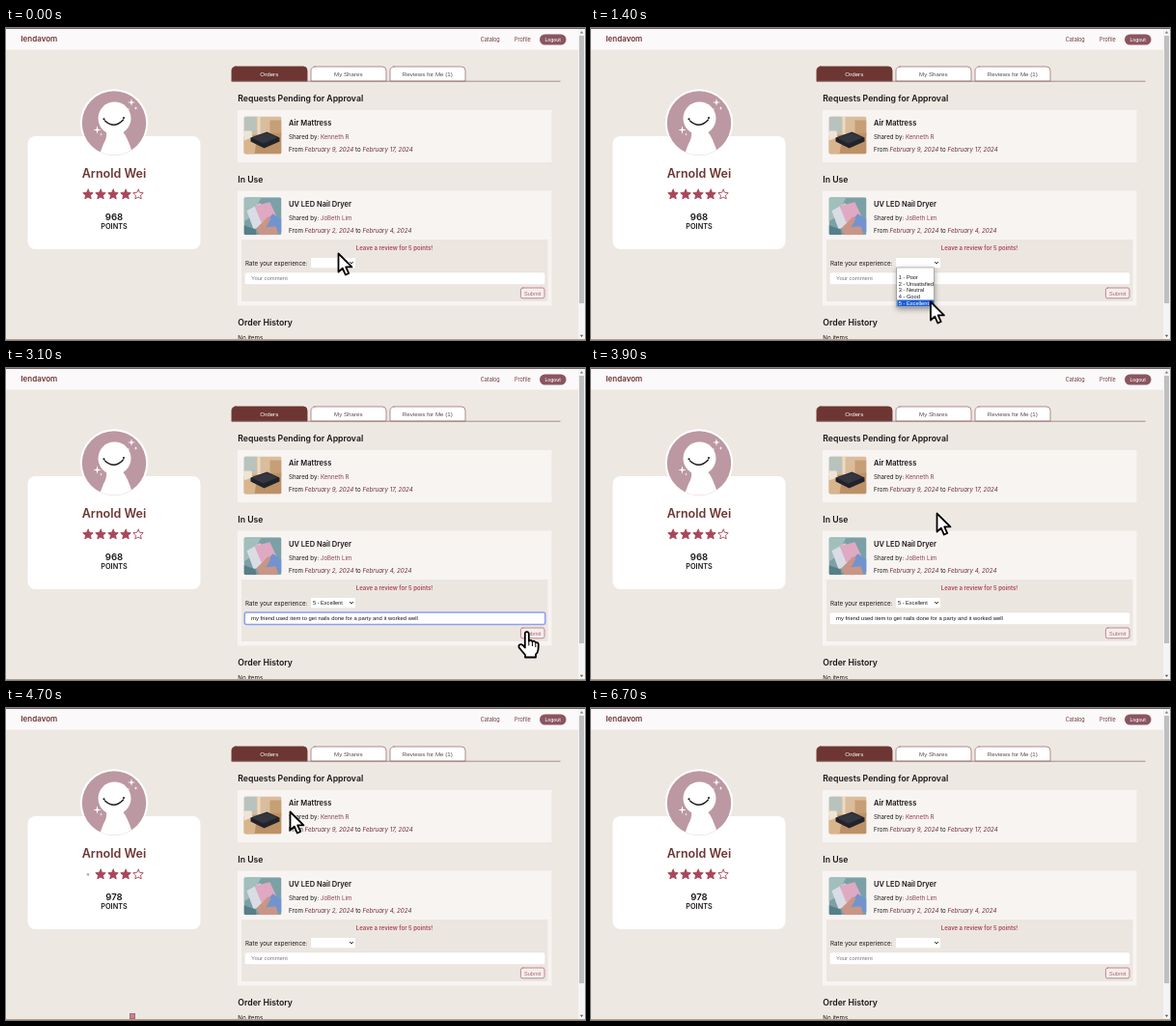
An HTML page with a canvas for the animation above (6900 ms loop, 600 px wide and 323 px high).

```html
<!DOCTYPE html>
<html lang="en">
<head>
<meta charset="utf-8">
<title>Profile page</title>
<style>
html, body { margin: 0; width: 100%; height: 100%; overflow: hidden; background: #ede8e2; }
canvas { display: block; width: 600px; height: 323px; }
</style>
</head>
<body>
<canvas id="stage"></canvas>
<script>
const W = 600, H = 323, LOOP = 6900, STEP = 100;
const RELOAD = 4200, LOADED = 4500, BURST = 4700, CURSOR_END = 6200;
const cv = document.getElementById('stage');
const g = cv.getContext('2d');
const dpr = window.devicePixelRatio || 1;
cv.width = W * dpr;
cv.height = H * dpr;

const SANS = 'Inter, sans-serif';
const ARIAL = '"Liberation Sans", Arial, sans-serif';
const BROWN = '#6d3632', PLUM = '#8b5560', ROSE = '#a9475a', INK = '#1c1718';
const COMMENT = 'my friend used item to get nails done for a party and it worked well';
const OPTIONS = ['1 - Poor', '2 - Unsatisfied', '3 - Neutral', '4 - Good', '5 - Excellent'];

function text(s, x, y, size, color, weight = '400', family = SANS, align = 'left') {
  g.font = `${weight} ${size}px ${family}`;
  g.fillStyle = color;
  g.textAlign = align;
  g.fillText(s, x, y);
  return x + g.measureText(s).width;
}

function box(x, y, w, h, r, fill, stroke, lw = 1) {
  g.beginPath();
  g.roundRect(x, y, w, h, r);
  if (fill) { g.fillStyle = fill; g.fill(); }
  if (stroke) { g.strokeStyle = stroke; g.lineWidth = lw; g.stroke(); }
}

function poly(pts, fill) {
  g.beginPath();
  pts.forEach(([x, y]) => g.lineTo(x, y));
  g.closePath();
  if (fill) { g.fillStyle = fill; g.fill(); }
}

function disc(x, y, r, fill) {
  g.beginPath();
  g.arc(x, y, r, 0, 7);
  g.fillStyle = fill;
  g.fill();
}

function clipped(x, y, w, h, r, draw) {
  g.save();
  g.beginPath();
  g.roundRect(x, y, w, h, r);
  g.clip();
  g.translate(x, y);
  draw();
  g.restore();
}

function seeded(seed) {
  return () => (seed = (seed * 16807) % 2147483647) / 2147483647;
}

function header(loaded) {
  box(0, 0, W, 22.5, 0, '#fcf9fb');
  box(0, 0, W, 1, 0, '#66605f');
  text('lendavom', 15.5, 14.4, 8, BROWN, '600');
  if (!loaded) {
    text('Catalog', 557, 14, 5.5, BROWN);
    return;
  }
  text('Catalog', 491.7, 14, 5.5, BROWN);
  text('Profile', 527, 14, 5.5, BROWN);
  box(553, 6.5, 27.5, 11, 5.5, PLUM);
  text('Logout', 566.7, 13.8, 4.9, '#fff', '500', SANS, 'center');
  box(593, 1, 7, 321, 0, '#f5f4f4');
  box(594, 8, 5, 277, 0, '#c0bfbf');
  poly([[594.8, 5.4], [598.2, 5.4], [596.5, 3.2]], '#777');
  poly([[594.8, 317.8], [598.2, 317.8], [596.5, 320]], '#555');
}

function sparkle(x, y, r) {
  const k = r * 0.2;
  poly([[x, y - r], [x + k, y - k], [x + r, y], [x + k, y + k],
    [x, y + r], [x - k, y + k], [x - r, y], [x - k, y - k]], '#fff');
}

function avatar() {
  disc(112, 98.5, 35.2, '#fff');
  g.save();
  g.beginPath();
  g.arc(112, 98.5, 33.2, 0, 7);
  g.clip();
  box(76, 60, 72, 72, 0, '#bb98a2');
  disc(112.5, 93.5, 17, '#fff');
  g.beginPath();
  g.moveTo(104, 106);
  g.quadraticCurveTo(105, 114, 101, 120);
  g.lineTo(96, 133);
  g.lineTo(132, 133);
  g.quadraticCurveTo(127, 114, 120, 106);
  g.fillStyle = '#fff';
  g.fill();
  g.restore();
  g.strokeStyle = INK;
  g.lineWidth = 1.3;
  g.lineCap = 'round';
  g.beginPath();
  g.moveTo(102.5, 96);
  g.quadraticCurveTo(112, 105, 121.5, 95);
  g.stroke();
  disc(101.5, 94.3, 1.1, INK);
  disc(122, 93, 1.1, INK);
  sparkle(94.5, 105.5, 4.3);
  sparkle(98.5, 110, 1.8);
  sparkle(130, 77, 4);
  sparkle(134.5, 83, 2);
  sparkle(127, 84, 1.5);
}

function star(x, y, r, turn, filled) {
  const pts = [];
  for (let i = 0; i < 10; i++) {
    const a = turn + i * Math.PI / 5 - Math.PI / 2, d = i % 2 ? r * 0.48 : r;
    pts.push([x + d * Math.cos(a), y + d * Math.sin(a)]);
  }
  poly(pts, filled ? ROSE : '#fff');
  g.strokeStyle = ROSE;
  g.lineWidth = 0.9;
  g.lineJoin = 'round';
  g.stroke();
}

function profile(t) {
  box(22.5, 112, 179, 117, 8, '#fff');
  avatar();
  text('Arnold Wei', 112, 154.8, 12.5, BROWN, '600', SANS, 'center');
  for (let i = 0; i < 5; i++) {
    const p = (t - BURST - i * 250) / 500;
    let size = 1, turn = 0;
    if (p >= 0 && p < 1) {
      const e = 1 - (1 - p) ** 3;
      size = 0.25 + 0.75 * e;
      turn = (1 - e) * -2;
      g.globalAlpha = 0.35 + 0.65 * e;
    }
    star(85 + 13 * i, 172.4, 5.5 * size, turn, i < 4);
    g.globalAlpha = 1;
  }
  text(t < RELOAD ? '968' : '978', 112, 199, 9.6, INK, '600', SANS, 'center');
  text('POINTS', 112, 208.4, 7.3, INK, '600', SANS, 'center');
}

function tab(x, label, active) {
  const r = [4, 4, 0, 0];
  box(x + 0.5, 40, 78, 15, r, active ? BROWN : '#fff', active ? BROWN : '#a98083', 0.9);
  text(label, x + 39.3, 49.8, 6.2, active ? '#fff' : '#5b4a4b', '400', ARIAL, 'center');
}

function mattressPhoto() {
  box(0, 0, 39, 39, 0, '#d9bd9c');
  box(0, 0, 13, 17, 0, '#b9c3bd');
  box(14, 0, 3, 19, 0, '#eadbc4');
  box(27, 4, 12, 16, 0, '#c79f77');
  poly([[0, 20], [39, 17], [39, 39], [0, 39]], '#bd9166');
  poly([[0, 25], [14, 20], [11, 39], [0, 39]], '#d8b58d');
  poly([[0, 15], [8, 15], [9, 22], [0, 25]], '#eee4d6');
  poly([[7, 22], [24, 16], [37, 22], [37, 26], [21, 33], [7, 26]], '#22232a');
  poly([[8, 22], [24, 17], [35, 22], [20, 28]], '#343640');
}

function dryerPhoto() {
  box(0, 0, 39, 39, 0, '#7ba0a6');
  poly([[0, 0], [18, 0], [8, 20], [0, 25]], '#a2bfbb');
  poly([[3, 14], [17, 6], [25, 28], [10, 33]], '#d9dce4');
  poly([[11, 9], [27, 5], [34, 20], [18, 26]], '#dfa9c2');
  poly([[20, 28], [30, 17], [39, 23], [39, 36], [28, 37]], '#7194cf');
  poly([[13, 32], [25, 20], [28, 22], [23, 31], [33, 30], [36, 39], [16, 39]], '#c99587');
  poly([[0, 29], [12, 33], [13, 39], [0, 39]], '#577f88');
}

function item(y, title, owner, from, to, photo) {
  clipped(246.5, y, 39, 39, 2, photo);
  text(title, 293, y + 9.6, 7.5, INK, '600');
  let x = text('Shared by: ', 293, y + 23.6, 6.15, INK);
  text(owner, x, y + 23.6, 6.15, '#8b3f55');
  const it = 'italic 400';
  x = text('From ', 293, y + 36.2, 6.2, INK);
  x = text(from, x, y + 36.2, 6.2, '#6f2f3b', it);
  x = text(' to ', x, y + 36.2, 6.2, INK);
  text(to, x, y + 36.2, 6.2, '#6f2f3b', it);
}

function review(t) {
  const active = t < RELOAD;
  const typed = active ? Math.round(COMMENT.length * Math.min(1, Math.max(0, (t - 2200) / 600))) : 0;
  const focus = t >= 2100 && t < 3300;

  box(244, 219, 317.5, 64, 0, '#ece6e0');
  text('Leave a review for 5 points!', 402.5, 230.2, 6, ROSE, '600', SANS, 'center');
  text('Rate your experience:', 248, 246, 6.25, INK);
  box(316, 238, 46, 10.3, 1, '#fff');
  if (active && t >= 1600) text(OPTIONS[4], 318, 245.2, 5.6, INK, '400', ARIAL);
  g.strokeStyle = INK;
  g.lineWidth = 0.9;
  g.beginPath();
  g.moveTo(356.4, 242.3);
  g.lineTo(358, 244);
  g.lineTo(359.6, 242.3);
  g.stroke();

  box(247.3, 253, 311.4, 12.5, 2, '#fff', focus ? '#8c9ff0' : '#e6dfdb', focus ? 1.5 : 0.5);
  const end = typed ? text(COMMENT.slice(0, typed), 254, 261.3, 5.9, INK, '400', ARIAL)
    : (text('Your comment', 254, 261.3, 5.9, '#7d7778', '400', ARIAL), 253.6);
  if (focus && t < 2900) box(end, 256, 0.7, 7, 0, INK);

  box(533.4, 269, 24.6, 10.8, 2, '#f4eeeb', '#bd7c88', 0.9);
  text('Submit', 545.7, 276.5, 5.6, '#b0697a', '400', ARIAL, 'center');
}

function dropdown(t) {
  if (t < 300 || t >= 1600) return;
  const row = [600, 700, 1000, 1200, 1300].filter(s => t >= s).length;
  g.save();
  g.shadowColor = 'rgba(0,0,0,.4)';
  g.shadowBlur = 6 * dpr;
  g.shadowOffsetY = 2 * dpr;
  box(317, 248, 38.5, 40.8, 0, '#fff');
  g.restore();
  box(317, 248, 38.5, 40.8, 0, null, '#8e8a8a', 0.6);
  box(317.3, 247.7 + 6.75 * row, 38, 6.7, 0, '#1d5fd3');
  OPTIONS.forEach((s, i) =>
    text(s, 318.7, 259.8 + 6.75 * i, 5.7, row === i + 1 ? '#fff' : INK, '400', ARIAL));
}

function orders(t) {
  tab(233.5, 'Orders', true);
  tab(315.5, 'My Shares');
  tab(397.5, 'Reviews for Me (1)');
  box(233.5, 54.7, 341, 0.9, 0, '#8d6a68');
  text('Requests Pending for Approval', 240.3, 76.3, 8.7, INK, '600');
  box(240, 85, 325.5, 54, 0, '#f7f4f2');
  item(91.5, 'Air Mattress', 'Kenneth R', 'February 9, 2024', 'February 17, 2024', mattressPhoto);
  text('In Use', 240.3, 160.2, 8.7, INK, '600');
  box(240, 168.5, 325.5, 119, 0, '#f7f4f2');
  item(175.3, 'UV LED Nail Dryer', 'JoBeth Lim', 'February 2, 2024', 'February 4, 2024', dryerPhoto);
  review(t);
  text('Order History', 240.3, 308.2, 8.7, INK, '600');
  text('No items.', 240.3, 323.2, 6.2, INK);
  dropdown(t);
}

// Launch speed decays exponentially while a constant drift pulls down.
function confetti(t) {
  const s = (t - BURST) / 1000;
  if (s < 0 || s >= 1.95) return;
  const rnd = seeded(4217);
  const tones = ['#8b5560', '#d9a9b3', '#6d3632', '#a9475a', '#c38294'];
  const out = 1 - Math.exp(-6.2 * s);
  for (let i = 0; i < 50; i++) {
    const a = (rnd() - 0.5) * 0.785, reach = 230 * (0.5 + rnd());
    const spin = (rnd() - 0.5) * 12, flip = 4 + rnd() * 8;
    g.save();
    g.translate(131 + reach * out * Math.sin(a), 319 - reach * out * Math.cos(a) + 120 * s);
    g.rotate(spin * s);
    g.scale(1, Math.cos(flip * s));
    g.globalAlpha = 1 - s / 2;
    box(-2.4, -2.4, 4.8, 4.8, 0, tones[i % 5]);
    g.restore();
  }
}

// time, x, y of the pointer's hot spot
const PATH = [
  [0, 344, 233], [200, 348, 241], [400, 349, 243], [800, 356, 270], [1300, 352, 283],
  [1600, 350, 283], [1900, 324, 260], [2800, 324, 260], [3100, 541, 273],
  [3500, 541, 273], [4100, 294, 107], [LOOP, 294, 107]
];

function pointerAt(t) {
  const i = PATH.findIndex(p => p[0] > t);
  const [t0, x0, y0] = PATH[i - 1], [t1, x1, y1] = PATH[i];
  const p = (t - t0) / (t1 - t0), e = p * p * (3 - 2 * p);
  return [x0 + (x1 - x0) * e, y0 + (y1 - y0) * e];
}

function outline(lw) {
  g.fillStyle = '#fff';
  g.strokeStyle = '#000';
  g.lineWidth = lw;
  g.lineJoin = 'round';
  g.fill();
  g.stroke();
}

function arrow() {
  poly([[0.5, 0.5], [0.5, 19.5], [4.8, 15.6], [7.8, 22.5], [11.2, 21], [8.2, 14.4], [14.4, 14.4]]);
  g.lineJoin = 'miter';
  outline(1.8);
}

function beam() {
  for (const [color, lw, d] of [['#000', 4.4, 0], ['#fff', 1.3, 1.5]]) {
    g.strokeStyle = color;
    g.lineWidth = lw;
    g.lineCap = 'butt';
    g.beginPath();
    g.moveTo(-6.5 + d, -8.3); g.lineTo(6.5 - d, -8.3);
    g.moveTo(0, -8.3); g.lineTo(0, 9.3);
    g.moveTo(-6.5 + d, 9.3); g.lineTo(6.5 - d, 9.3);
    g.stroke();
  }
}

function hand() {
  g.beginPath();
  g.moveTo(-3.2, 15);
  g.lineTo(-3.2, 2.4);
  g.quadraticCurveTo(-3.2, 0.2, -1.2, 0.2);
  g.quadraticCurveTo(0.8, 0.2, 0.8, 2.4);
  g.lineTo(0.8, 9.5);
  g.quadraticCurveTo(3, 7.8, 4.4, 10.2);
  g.quadraticCurveTo(6.6, 8.8, 7.8, 11.2);
  g.quadraticCurveTo(10.8, 10.6, 10.8, 13.6);
  g.lineTo(10.4, 19);
  g.quadraticCurveTo(10, 22, 8, 23.5);
  g.lineTo(8, 26.5);
  g.lineTo(-3, 26.5);
  g.lineTo(-3, 24);
  g.lineTo(-9.3, 16.5);
  g.quadraticCurveTo(-10.4, 13.6, -7.6, 13.2);
  g.quadraticCurveTo(-5.6, 13, -3.2, 16.5);
  g.closePath();
  outline(1.8);
  g.lineWidth = 1;
  g.beginPath();
  for (const [x, y] of [[0.8, 9.5], [4.4, 10.2], [7.8, 11.2]]) {
    g.moveTo(x, y);
    g.lineTo(x, y + 4.5);
  }
  g.stroke();
}

function pointer(t) {
  if (t >= CURSOR_END) return;
  const shape = t >= 1900 && t < 2900 ? beam : t >= 3000 && t < 3600 ? hand : arrow;
  g.save();
  g.translate(...pointerAt(t));
  shape();
  g.restore();
}

function draw(t) {
  g.setTransform(dpr, 0, 0, dpr, 0, 0);
  box(0, 0, W, H, 0, '#ede8e2');
  const loaded = t < RELOAD || t >= LOADED;
  header(loaded);
  if (loaded) {
    profile(t);
    orders(t);
    confetti(t);
  }
  box(0, 322, W, 1, 0, '#b39c88');
  pointer(t);
}

const start = performance.now();
function tick() {
  const t = (performance.now() - start) % LOOP;
  draw(Math.floor(t / STEP) * STEP);
  requestAnimationFrame(tick);
}
tick();
</script>
</body>
</html>
```
